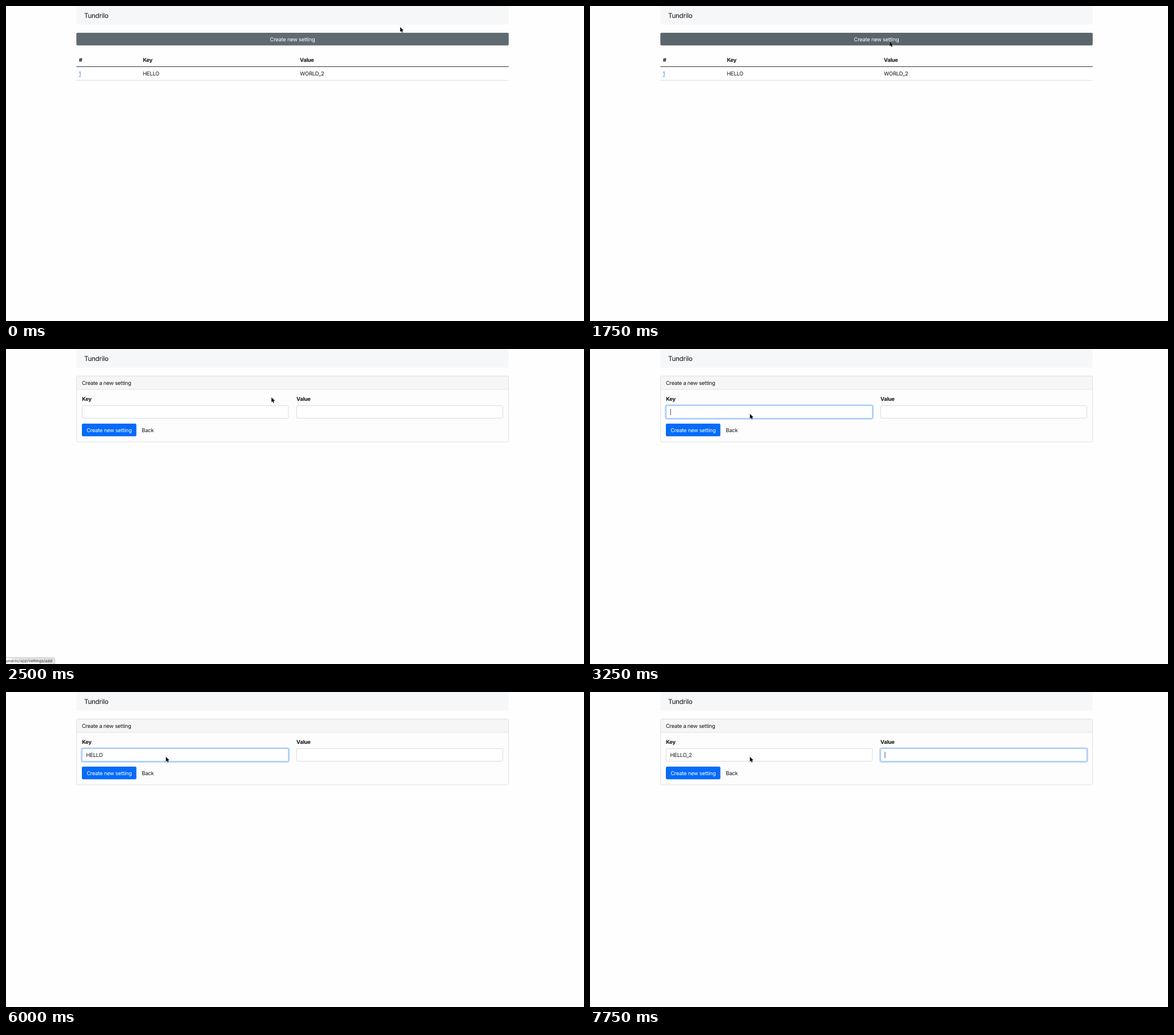
Recreate the animation shown at these times as an HTML page. Size 1013 by 553 pixels, loop 8000 ms.

```html
<!DOCTYPE html>
<html lang="en">
<head>
<meta charset="utf-8">
<title>Settings form</title>
<style>
  html, body { margin: 0; height: 100%; overflow: hidden; background: #fefefe; }
  svg { display: block; width: 100vw; height: 100vh; }
  text {
    font: 9.36px Inter, "Open Sans", sans-serif;
    letter-spacing: -.025em;
    text-rendering: geometricPrecision;
    fill: #111;
  }
  .brand { font-size: 11.7px; }
  .bold { font-weight: 700; }
  .light { fill: #fff; }
  .center { text-anchor: middle; }
  .link { fill: #0a7cff; text-decoration: underline; }
  .status { font-size: 7px; letter-spacing: 0; text-anchor: end; fill: #333; }
  .input { fill: #fff; stroke: #ced2d6; stroke-width: .8; }
  .input.focus { stroke: #86b7fe; }
  .ring { fill: none; stroke: #b9d7fc; stroke-width: 2.3; }
</style>
</head>
<body>
<svg viewBox="0 0 1013 553">
  <path d="M123.5 0H881V30.5a2 2 0 0 1-2 2H125.5a2 2 0 0 1-2-2Z" fill="#f6f7f9"/>
  <text class="brand" x="137" y="20.6">Tundrilo</text>

  <g id="listPage">
    <rect id="buttonRing" x="122.2" y="45.8" width="760" height="24.4" rx="3" fill="none" stroke="#bcc2c5" stroke-width="2.3"/>
    <rect id="button" x="123.3" y="47" width="757.7" height="22.2" rx="2.2"/>
    <text class="light center" x="502" y="61.5">Create new setting</text>
    <g class="bold">
      <text class="bold" x="127.8" y="98.4">#</text>
      <text class="bold" x="240" y="98.4">Key</text>
      <text class="bold" x="515" y="98.4">Value</text>
    </g>
    <path d="M123.3 106.5H881" stroke="#333"/>
    <text class="link" x="127.6" y="122.4">1</text>
    <text x="239.8" y="122.4">HELLO</text>
    <text x="515" y="122.4">WORLD_2</text>
    <path d="M123.3 130.5H881" stroke="#dee1e4"/>
  </g>

  <g id="formPage">
    <rect x="123.7" y="47.4" width="757" height="115.6" rx="2.2" fill="#fdfdfd"/>
    <path d="M123.7 71V49.6a2.2 2.2 0 0 1 2.2-2.2H878.5a2.2 2.2 0 0 1 2.2 2.2V71Z" fill="#f6f6f6"/>
    <path d="M123.7 71H880.7" stroke="#dadada" stroke-width=".8"/>
    <rect x="123.7" y="47.4" width="757" height="115.6" rx="2.2" fill="none" stroke="#d8d8d8" stroke-width=".8"/>
    <text x="133" y="62.8">Create a new setting</text>
    <text class="bold" x="133.2" y="91.4">Key</text>
    <text class="bold" x="509" y="91.4">Value</text>
    <rect id="keyRing" class="ring" x="132.2" y="98.3" width="363.9" height="24.5" rx="3"/>
    <rect id="keyInput" class="input" x="133.5" y="99.5" width="361.3" height="22" rx="2.2"/>
    <text id="keyText" x="140.6" y="114.2"></text>
    <rect id="valueRing" class="ring" x="508.1" y="98.3" width="363.9" height="24.5" rx="3"/>
    <rect id="valueInput" class="input" x="509.4" y="99.5" width="361.3" height="22" rx="2.2"/>
    <rect id="caret" y="105" width=".8" height="11" fill="#222"/>
    <rect x="133" y="131" width="95.5" height="22.2" rx="2.2" fill="#056bfa"/>
    <text class="light center" x="180.7" y="145.8">Create new setting</text>
    <text x="238" y="145.8">Back</text>
  </g>

  <g id="status">
    <path d="M-1 541.8H82.5a3.2 3.2 0 0 1 3.2 3.2V554" fill="#dee0e3" stroke="#c3c5c8" stroke-width=".8"/>
    <text class="status" x="81" y="550.2">tundrilo/app/settings/add</text>
  </g>

  <path id="cursor" d="M0 0V8.4L1.9 6.7 3.2 9.6 4.7 9 3.4 6.1H6Z" fill="#000" stroke="#fff" stroke-width=".7" paint-order="stroke"/>
</svg>

<script>
const LOOP = 8000, STEP = 250;

const HOVER = 1500, STATUS_ON = 2000, PRESS = 2250, FORM = 2500,
      STATUS_OFF = 2750, KEY_FOCUS = 3250, VALUE_FOCUS = 7500;

// Pointer positions, one per step; the last one is held.
const pointer = [
  [690.8, 37], [684, 41], [652, 55], [603, 67], [558, 72], [535, 72],
  [527, 66], [525.3, 62.3], [521, 58.5], [520.8, 58.2],
  [465.3, 85], [385, 99], [290, 112.5], [280.3, 113.8]
];

const typing = [
  [0, ""], [3750, "h"], [4250, ""], [4500, "H"], [4750, "HE"], [5000, "HEL"],
  [5250, "HELL"], [5500, "HELLO"], [6750, "HELLO_"], [7250, "HELLO_2"]
];

const el = id => document.getElementById(id);
const show = (id, visible) => el(id).style.display = visible ? "" : "none";
const between = (t, from, to) => t >= from && t < to;

function focusInput(name, focused) {
  show(name + "Ring", focused);
  el(name + "Input").classList.toggle("focus", focused);
}

function draw(time) {
  const t = Math.floor(time % LOOP / STEP) * STEP;

  show("listPage", t < FORM);
  show("formPage", t >= FORM);
  show("status", between(t, STATUS_ON, STATUS_OFF));
  show("buttonRing", t >= PRESS);
  el("button").setAttribute("fill", t >= PRESS ? "#4b545a" : t >= HOVER ? "#5b666c" : "#606b71");

  const onKey = between(t, KEY_FOCUS, VALUE_FOCUS), onValue = t >= VALUE_FOCUS;
  focusInput("key", onKey);
  focusInput("value", onValue);

  const keyText = el("keyText");
  keyText.textContent = typing.findLast(([start]) => t >= start)[1];
  const blinkedOff = between(t, 6000, 6500);
  show("caret", (onKey || onValue) && !blinkedOff);
  const typedWidth = keyText.textContent ? keyText.getComputedTextLength() : 0;
  el("caret").setAttribute("x", onValue ? 516.6 : 140.8 + typedWidth);

  const [x, y] = pointer[Math.min(t / STEP, pointer.length - 1)];
  el("cursor").setAttribute("transform", `translate(${x} ${y})`);
}

let start;
function tick(now) {
  start ??= now;
  draw(now - start);
  requestAnimationFrame(tick);
}
draw(0);
requestAnimationFrame(tick);
</script>
</body>
</html>
```
